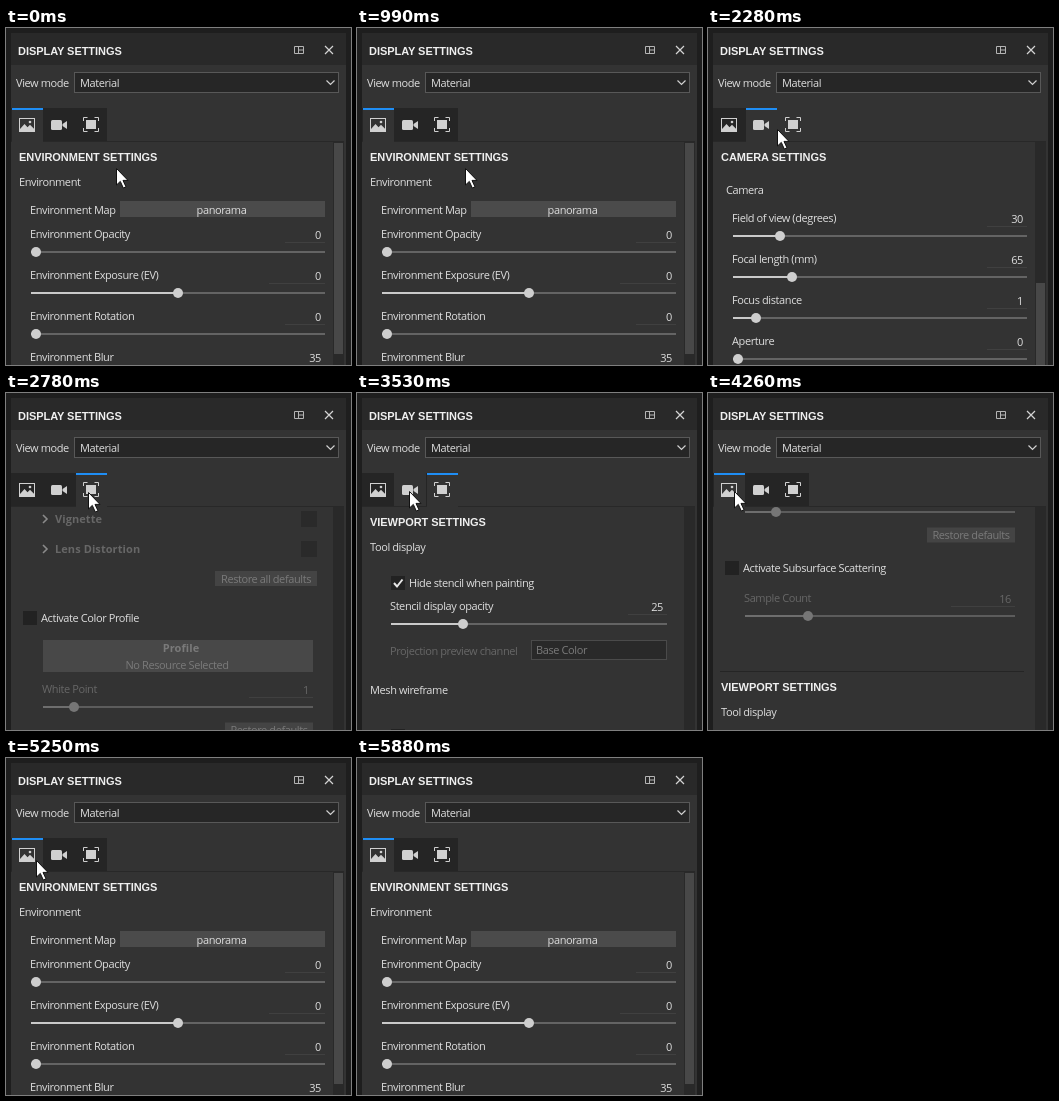
Recreate the animation shown at these times as an HTML page. Size 345x337 px, loop 6.19 s.

```html
<!DOCTYPE html>
<html lang="en">
<head>
<meta charset="utf-8">
<title>Display settings</title>
<style>
  html, body { margin: 0; width: 100%; height: 100%; overflow: hidden; background: #1e1e1e; }
  svg { display: block; width: 345px; height: 337px; }
  text { font: 11px "Open Sans", "Noto Sans", sans-serif; letter-spacing: -.4px; fill: #dedede; white-space: pre; }
  .head { font: bold 11px "Liberation Sans", Arial, sans-serif; letter-spacing: -.05px; fill: #efefef; }
  .bold { font-weight: bold; letter-spacing: .08px; }
  .off { fill: #676767; }
  .dim { fill: #7a7a7a; }
</style>
</head>
<body>
<svg viewBox="0 0 345 337">
  <defs><clipPath id="view"><rect x="5" y="114" width="322" height="223"/></clipPath></defs>
  <rect width="345" height="337" fill="#1e1e1e"/>
  <rect x="5" y="5" width="335" height="332" fill="#333"/>
  <rect x="5" y="5" width="335" height="32" fill="#292929"/>
  <g id="chrome"></g>
  <g id="tabs"></g>
  <g fill="#d0d0d0">
    <path d="M13 90h16v14h-16zM14 91v10l4.500-5 3 3.200 2.500-2.500 4 4v-9.700z" fill-rule="evenodd"/>
    <circle cx="24" cy="94" r="1.300"/>
    <rect x="45" y="92" width="11" height="10" rx="1.500"/>
    <path d="M56.500 96l4.500-3v8l-4.500-3z"/>
    <rect x="80" y="92" width="10" height="9"/>
    <path d="M77.500 93v-3.500h4M88.500 89.500h4v3.500M92.500 100v3.500h-4M81.500 103.500h-4v-3.500" fill="none" stroke="#d0d0d0"/>
  </g>
  <g clip-path="url(#view)"><g id="page"></g></g>
  <rect x="327" y="114" width="11" height="223" fill="#292929"/>
  <rect id="thumb" x="328" width="9" height="211" fill="#484848"/>
  <path id="cursor" d="M.5 .5v16.500l3.800-3.600 3 6.600 2.700-1.200-3-6.400h5z" fill="#fff" stroke="#111"/>
</svg>
<script>
const $ = id => document.getElementById(id);
const LOOP = 6190;
const POST = 925, VIEWPORT = 1285, CAMERA = 385;

// Drawing helpers: y is the middle of a row
const text = (x, y, s, cls = "", anchor = "start") =>
  `<text x="${x}" y="${y + 4}" class="${cls}" text-anchor="${anchor}">${s}</text>`;
const box = (x, y, w, h, fill, stroke = "none") =>
  `<rect x="${x}" y="${y}" width="${w}" height="${h}" fill="${fill}" stroke="${stroke}"/>`;
const line = (d, color, width = 1) =>
  `<path d="${d}" fill="none" stroke="${color}" stroke-width="${width}"/>`;
const group = (dy, rows) => `<g transform="translate(0 ${dy})">${rows.join("")}</g>`;

const head = (y, s) => text(13, y, s, "head");
const rule = y => box(12, y, 304, 1, "#252525");
const combo = (x, y, right, s) =>
  box(x + .5, y - 9.5, right - x - 1, 19, "#292929", "#4a4a4a") + text(x + 5, y, s, "dim");
const button = (x, y, w, h, s) =>
  box(x, y - h / 2, w, h, "#444") + text(x + w / 2, y, s, "dim", "middle");
const check = (x, y, s, on) => box(x, y - 7, 14, 14, "#222") + text(x + 18, y, s) +
  (on ? line(`M${x + 3} ${y}l3 3.500 5.500-7`, "#e6e6e6", 2) : "");
const effect = (y, s) => line(`M37 ${y - 4}l4 4-4 4`, "#8a8a8a", 1.6) +
  text(49, y, s, "bold off") + box(295, y - 8, 16, 16, "#2a2a2a");

function slider(y, label, value, knob, { x = 25, right = 319, field = 279, off = false } = {}) {
  const cls = off ? "off" : "";
  const bar = y + 17;
  return text(x - 1, y, label, cls) + text(right - 4, y + 1, value, cls, "end") +
    box(field, y + 8, right - field, 1, "#404040") +
    box(x, bar, right - x, 2, off ? "#5c5c5c" : "#646464") +
    box(x, bar, knob - x, 2, off ? "#6e6e6e" : "#cacaca") +
    `<circle cx="${knob}" cy="${bar + 1}" r="5" fill="${off ? "#767676" : "#cecece"}"/>`;
}

$("chrome").innerHTML =
  text(12, 22.5, "DISPLAY SETTINGS", "head") +
  line("M288.500 18.500h9v7h-9zM292.500 18.500v7M292.500 22h5", "#b4b4b4") +
  line("M319 18l8 8M327 18l-8 8", "#d4d4d4", 1.2) +
  text(10, 55, "View mode") + box(68.5, 44.5, 264, 20, "#262626", "#585858") +
  text(74, 55, "Material") + line("M320.500 52.500l4 4 4-4", "#d0d0d0", 1.2);

const stencil = { x: 34, right: 310, field: 271 };
const profile = { x: 37, right: 307, field: 243, off: true };
const effects = ["Depth of Field", "Tone Mapping", "Color Correction", "Glare", "Vignette", "Lens Distortion"];

const environment = [
  head(129, "ENVIRONMENT SETTINGS"),
  text(13, 154, "Environment"),
  text(24, 182, "Environment Map"),
  box(114, 173, 205, 16, "#4b4b4b"), text(215.5, 182, "panorama", "", "middle"),
  slider(206, "Environment Opacity", 0, 30),
  slider(247, "Environment Exposure (EV)", 0, 172, { field: 263 }),
  slider(288, "Environment Rotation", 0, 30),
  slider(329, "Environment Blur", 35, 129),
  text(13, 374, "Shadows"),
  check(25, 401, "Shadows"),
  text(24, 427, "Computation mode"), combo(175, 427, 319, "Lightweight"),
  slider(454, "Shadows opacity", 100, 314, { off: true }),
];
const camera = [
  rule(113), head(129, "CAMERA SETTINGS"),
  text(18, 162, "Camera"),
  slider(190, "Field of view (degrees)", 30, 72),
  slider(231, "Focal length (mm)", 65, 84),
  slider(272, "Focus distance", 1, 48),
  slider(313, "Aperture", 0, 30),
  button(209, 363, 102, 15, "Restore defaults"),
  rule(395), text(13, 415, "Post effects"),
  check(18, 445, "Activate Post Effects"),
];
const post = [
  ...effects.map((s, i) => effect(6 + 30 * i, s)),
  button(209, 185.5, 102, 15, "Restore all defaults"),
  check(17, 225, "Activate Color Profile"),
  box(37, 247, 270, 32, "#484848"),
  text(175, 255, "Profile", "bold dim", "middle"),
  text(171, 272, "No Resource Selected", "dim", "middle"),
  slider(296, "White Point", 1, 68, profile),
  button(219, 337, 88, 15, "Restore defaults"),
  check(17, 370, "Activate Subsurface Scattering"),
  slider(400, "Sample Count", 16, 100, profile),
];
const viewport = [
  rule(113), head(129, "VIEWPORT SETTINGS"),
  text(13, 154, "Tool display"),
  check(34, 190, "Hide stencil when painting", true),
  slider(213, "Stencil display opacity", 25, 106, stencil),
  text(33, 258, "Projection preview channel", "off"), combo(174, 257, 310, "Base Color"),
  text(13, 297, "Mesh wireframe"),
  check(34, 343, "Display mesh wireframe"),
];
$("page").innerHTML =
  group(0, environment) + group(CAMERA, camera) + group(POST, post) + group(VIEWPORT, viewport);

// Last entry whose time has been reached
const at = (steps, t) => steps.reduce((hit, s) => s[0] <= t ? s : hit);
const leg = (start, gap, points) => points.map((p, i) => [start + gap * i, ...p]);

const scrolls = [
  [0, 0], [1620, 12], [1690, 75], [1760, 228], [1840, 362], [1930, CAMERA],
  [2690, 520], [2780, POST], [2860, 1180], [2940, 1272], [3010, VIEWPORT],
  [4260, 1120], [4350, 278], [4440, 13], [4530, 0],
];
const active = [[0, 0], [1620, 1], [2690, 2], [4260, 0]];
const moves = [
  [0, 110, 140],
  ...leg(990, 90, [[108, 140], [104, 140], [93, 133], [80, 122], [68, 111], [60, 104], [56, 101]]),
  ...leg(2110, 80, [[58, 101], [62, 101], [69, 101], [76, 100], [81, 100], [82, 99]]),
  ...leg(3350, 90, [[81, 99], [70, 99], [52, 98], [36, 96], [24, 94], [18, 96], [26, 98]]),
  ...leg(5250, 90, [[30, 102], [52, 119], [95, 153], [155, 199], [215, 246], [270, 288], [313, 320]]),
  [5880, 400, 400],
];

function drawTabs(current, cx, cy) {
  const tab = i => {
    const x = 5 + 32 * i;
    const hover = cx >= x && cx < x + 32 && cy >= 80 && cy < 113;
    if (i === current) return box(x + 1, 80, 31, 34, "#333") + box(x + 1, 80, 31, 2, "#1f8ef5");
    return hover ? box(x, 80, 32, 33, "#333") : "";
  };
  $("tabs").innerHTML = box(5, 80, 96, 33, "#252525") + box(5, 113, 333, 1, "#282828") +
    [0, 1, 2].map(tab).join("");
}

function draw(t) {
  const [, y] = at(scrolls, t);
  const [, cx, cy] = at(moves, t);
  $("page").setAttribute("transform", `translate(0 ${-y})`);
  $("thumb").setAttribute("y", Math.round(115 + y * .364));
  $("cursor").setAttribute("transform", `translate(${cx} ${cy})`);
  drawTabs(at(active, t)[1], cx, cy);
}

const begin = performance.now();
function frame() {
  draw((performance.now() - begin) % LOOP);
  requestAnimationFrame(frame);
}
draw(0);
requestAnimationFrame(frame);
</script>
</body>
</html>
```
